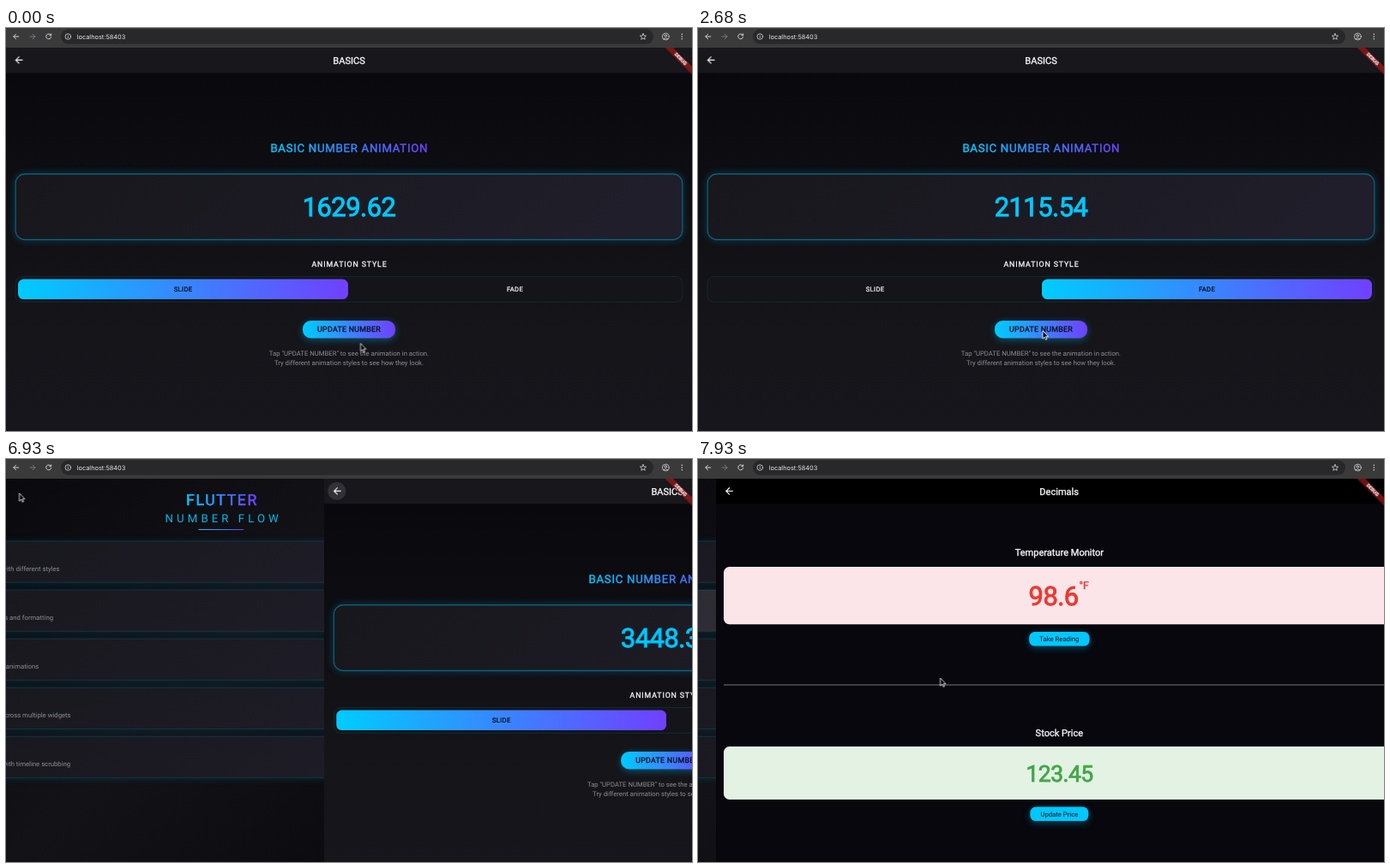
An HTML page for the animation above (8000 ms loop, 800 px wide and 471 px high).

```html
<!DOCTYPE html>
<html lang="en">
<head>
<meta charset="utf-8">
<title>Number animation demo</title>
<style>
html, body { margin: 0; width: 100%; height: 100%; overflow: hidden; background: #08080d; }
svg { display: block; width: 100vw; height: 100vh; }
text { font-family: Roboto, "Liberation Sans", sans-serif; text-rendering: geometricPrecision; white-space: pre; }
.m { text-anchor: middle; }
.b { stroke-width: .032em; }
.white { fill: #f7f7fa; }
.white.b { stroke: #f7f7fa; }
.dark { fill: #0a0a10; }
.dark.b { stroke: #0a0a10; }
.cyan { fill: #00c8ff; }
.cyan.b { stroke: #00c8ff; }
.grad { fill: url(#accent); }
.grad.b { stroke: url(#accent); }
.red { fill: #ea3a32; stroke: #ea3a32; }
.green { fill: #43a648; stroke: #43a648; }
.grey { fill: #8d8d93; }
.none { fill: none; stroke: none; }
.bar { font-size: 11.05px; }
.body { font-size: 7.735px; }
.head { font-size: 9.945px; }
.tab { font-size: 7.735px; letter-spacing: .28px; }
.num { font-size: 30.94px; letter-spacing: -.55px; }
.glow { filter: drop-shadow(0 0 5px rgba(0, 200, 255, .24)); }
.soft { filter: drop-shadow(0 1px 4px rgba(0, 200, 255, .13)); }
.lift { filter: drop-shadow(0 2px 4px rgba(0, 200, 255, .36)); }
.line { fill: none; stroke-linecap: round; stroke-linejoin: round; }

#home, #basics, #decimals, #cursor, .num, #selSlide, #selFade, #press, #ring, #hover1, #hover2 {
  animation: 8s linear infinite;
}
#home { animation-name: home; }
#basics { animation-name: basics; }
#decimals { animation-name: decimals; }
#cursor { animation-name: cursor; }
#selSlide { animation-name: selSlide; }
#selFade { animation-name: selFade; }
#press { animation-name: press; }
#ring { animation-name: ring; }
#hover1 { animation-name: hover1; }
#hover2 { animation-name: hover2; }
#n1 { animation-name: n1; }
#n2 { animation-name: n2; }
#n3 { animation-name: n3; }
#n4 { animation-name: n4; }

@keyframes basics {
  0% { transform: translateX(0); }
  85.575% { transform: translateX(0); animation-timing-function: cubic-bezier(.283, .044, .545, .57); }
  86.8125% { transform: translateX(432.8px); animation-timing-function: cubic-bezier(.209, 1, .4345, .976); }
  91.825%, 100% { transform: translateX(800px); }
}
@keyframes home {
  0% { transform: translateX(-266.7px); }
  85.575% { transform: translateX(-266.7px); animation-timing-function: cubic-bezier(.35, .91, .33, .97); }
  91.825% { transform: translateX(0); }
  95.375% { transform: translateX(0); animation-timing-function: cubic-bezier(.402, .787, .443, .95); }
  100% { transform: translateX(-261.8px); }
}
@keyframes decimals {
  0% { transform: translateX(800px); }
  95.375% { transform: translateX(800px); animation-timing-function: cubic-bezier(.283, .044, .545, .57); }
  96.6125% { transform: translateX(367.2px); animation-timing-function: cubic-bezier(.242, .798, .499, .957); }
  100% { transform: translateX(7.3px); }
}
@keyframes n1 {
  0% { transform: translateY(0); }
  5% { transform: translateY(0); animation-timing-function: cubic-bezier(.215, .61, .355, 1); }
  15%, 100% { transform: translateY(-48px); }
}
@keyframes n2 {
  0% { transform: translateY(48px); opacity: 1; }
  5% { transform: translateY(48px); animation-timing-function: cubic-bezier(.215, .61, .355, 1); }
  15% { transform: translateY(0); }
  33.75% { opacity: 1; }
  42.875%, 100% { opacity: 0; transform: translateY(0); }
}
@keyframes n3 {
  0%, 33.75% { opacity: 0; }
  42.875%, 100% { opacity: 1; }
  0% { transform: translateY(0); }
  70.375% { transform: translateY(0); animation-timing-function: cubic-bezier(.215, .61, .355, 1); }
  80.375%, 100% { transform: translateY(-48px); }
}
@keyframes n4 {
  0% { transform: translateY(48px); }
  70.375% { transform: translateY(48px); animation-timing-function: cubic-bezier(.215, .61, .355, 1); }
  80.375%, 100% { transform: translateY(0); }
}
@keyframes selSlide {
  0%, 16% { opacity: 1; }
  18.5%, 46.75% { opacity: 0; }
  48.75%, 100% { opacity: 1; }
}
@keyframes selFade {
  0%, 16% { opacity: 0; }
  18.5%, 46.75% { opacity: 1; }
  48.75%, 100% { opacity: 0; }
}
@keyframes press {
  0%, 4.75% { opacity: 0; }
  5.5%, 6.75% { opacity: .22; }
  9.25%, 33.5% { opacity: 0; }
  34.25%, 35.5% { opacity: .22; }
  38%, 70% { opacity: 0; }
  70.75%, 72% { opacity: .22; }
  74.5%, 100% { opacity: 0; }
}
@keyframes ring {
  0%, 82.3% { opacity: 0; }
  83%, 100% { opacity: 1; }
}
@keyframes hover1 {
  0%, 88.6% { opacity: 0; }
  89%, 89.6% { opacity: .045; }
  90.2%, 100% { opacity: 0; }
}
@keyframes hover2 {
  0%, 89.8% { opacity: 0; }
  90.4%, 95% { opacity: .045; }
  96%, 100% { opacity: .09; }
}
@keyframes cursor {
  0% { transform: translate(413.5px, 368.5px); }
  1.5% { transform: translate(413px, 371px); animation-timing-function: ease-in-out; }
  4.125% { transform: translate(405px, 354px); }
  12.5% { transform: translate(407px, 354px); animation-timing-function: ease-in-out; }
  15.625% { transform: translate(484.5px, 303px); }
  21.25% { transform: translate(484.5px, 303px); animation-timing-function: ease-in-out; }
  27.5% { transform: translate(420px, 381px); }
  30.6% { transform: translate(414px, 382px); animation-timing-function: ease-in-out; }
  33.1%, 45.25% { transform: translate(402px, 354px); }
  46.5% { transform: translate(362px, 307px); }
  47.5% { transform: translate(364px, 309px); }
  49.125% { transform: translate(374.5px, 320px); }
  52.5% { transform: translate(384px, 372px); }
  58.75% { transform: translate(376px, 380px); animation-timing-function: ease-in-out; }
  64.75% { transform: translate(388px, 354px); }
  71% { transform: translate(389px, 349px); }
  76% { transform: translate(390px, 350px); animation-timing-function: ease-in-out; }
  83.125% { transform: translate(16px, 39px); }
  86.625% { transform: translate(15.5px, 40px); animation-timing-function: ease-in-out; }
  91.625%, 92.125% { transform: translate(266.5px, 192px); }
  95% { transform: translate(269px, 187px); }
  99.125% { transform: translate(282.5px, 256px); }
  100% { transform: translate(283px, 257px); }
}
</style>
</head>
<body>
<svg viewBox="0 0 800 471" preserveAspectRatio="none">
  <defs>
    <linearGradient id="accent"><stop stop-color="#00ccff"/><stop offset="1" stop-color="#7040ff"/></linearGradient>
    <linearGradient id="panel" y2=".1"><stop stop-color="#17171c"/><stop offset="1" stop-color="#201e2a"/></linearGradient>
    <linearGradient id="page" x2="0" y2="1"><stop stop-color="#07070c"/><stop offset=".75" stop-color="#15151a"/><stop offset="1" stop-color="#16161c"/></linearGradient>
    <linearGradient id="homeBg" gradientUnits="userSpaceOnUse" x1="170" y1="0" x2="630" y2="471"><stop stop-color="#09090e"/><stop offset=".5" stop-color="#121217"/><stop offset="1" stop-color="#09090e"/></linearGradient>
    <linearGradient id="edge" x2="0" y2="1"><stop stop-color="#000"/><stop offset=".23" stop-color="#fff"/><stop offset=".77" stop-color="#fff"/><stop offset="1" stop-color="#000"/></linearGradient>
    <mask id="window" maskUnits="userSpaceOnUse" x="300" y="185" width="200" height="48"><rect x="300" y="185" width="200" height="48" fill="url(#edge)"/></mask>
    <path id="back" d="M20 11H7.83l5.59-5.59L12 4l-8 8 8 8 1.41-1.41L7.83 13H20z" transform="translate(8.4 30.9) scale(.5525)" fill="#fff"/>
    <g id="card">
      <rect class="soft" x="10.9" y="96" width="778.2" height="48.2" rx="9" fill="url(#panel)" stroke="#0e3d4c" stroke-width=".8"/>
      <rect x="21.7" y="107.5" width="25.4" height="25.4" rx="6.2" fill="url(#accent)"/>
      <rect x="761.3" y="111.7" width="16.6" height="16.6" rx="4.4" fill="#102b38"/>
      <path class="line" d="M768 116.8l3.2 3.2-3.2 3.2" stroke="#00c8ff" stroke-width="1.1"/>
    </g>
  </defs>

  <g id="home">
    <rect width="1100" height="471" fill="url(#homeBg)"/>
    <text class="m b grad" x="401.3" y="53.8" font-size="17.68" letter-spacing="1.68">FLUTTER</text>
    <text class="m cyan" x="403" y="73.6" font-size="13.26" letter-spacing="4.05" opacity=".92">NUMBER FLOW</text>
    <rect x="373.5" y="81.9" width="53" height="1.2" rx=".6" fill="url(#accent)"/>
    <use href="#card"/><use href="#card" y="57.1"/><use href="#card" y="114.2"/><use href="#card" y="171.3"/><use href="#card" y="228.4"/>
    <g fill="#fff">
      <rect id="hover1" x="11" y="96" width="778" height="48.2" rx="9"/>
      <rect id="hover2" x="11" y="153.1" width="778" height="48.2" rx="9"/>
    </g>
    <g class="head b white">
      <text class="b white" x="55" y="117">Basics</text>
      <text class="b white" x="55" y="174.1">Decimals</text>
      <text class="b white" x="55" y="231.2">Compact</text>
      <text class="b white" x="55" y="288.3">Group Sync</text>
      <text class="b white" x="55" y="345.4">Scrub Timeline</text>
    </g>
    <g class="body grey">
      <text x="55" y="130.8">Basic number animations with different styles</text>
      <text x="55" y="187.9">Decimal number animations and formatting</text>
      <text x="55" y="245">Compact notation (K, M, B) animations</text>
      <text x="55" y="302.1">Synchronized animations across multiple widgets</text>
      <text x="55" y="359.2">Manual animation control with timeline scrubbing</text>
    </g>
    <g fill="#14141c" stroke="#14141c" stroke-width="0">
      <path transform="translate(27.8 113.6) scale(.5525)" fill-rule="evenodd" d="M20 10V8h-4V4h-2v4h-4V4H8v4H4v2h4v4H4v2h4v4h2v-4h4v4h2v-4h4v-2h-4v-4zm-6 4h-4v-4h4z"/>
      <g transform="translate(27.8 170.7) scale(.5525)" class="line" stroke-width="2">
        <rect x="2" y="4" width="20" height="16" rx="1"/><path d="M6 12V8h4M18 12v4h-4" stroke-linecap="butt"/>
      </g>
      <path transform="translate(27.8 227.8) scale(.5525)" d="M4 9h16v2H4zM4 13h16v2H4zM8 19h3v4h2v-4h3l-4-4zM16 5h-3V1h-2v4H8l4 4z"/>
      <g transform="translate(27.8 284.9) scale(.5525)">
        <path d="M12 5a7 7 0 0 1 6 10.5M12 19a7 7 0 0 1-6-10.5" fill="none" stroke-width="2"/>
        <path d="M12 1v8L8 5zM12 15v8l4-4z"/>
      </g>
      <g transform="translate(27.8 342) scale(.5525)">
        <path d="M3 16l7-7 5 5 6-6" fill="none" stroke-width="2"/>
        <circle cx="3" cy="16" r="2"/><circle cx="10" cy="9" r="2"/><circle cx="15" cy="14" r="2"/><circle cx="21" cy="8" r="2"/>
      </g>
    </g>
  </g>

  <g id="basics">
    <rect y="23" width="800" height="448" fill="url(#page)"/>
    <rect y="23" width="800" height="29.4" fill="#17171c"/>
    <circle id="ring" cx="14.7" cy="37.5" r="10.6" fill="#313137"/>
    <use href="#back"/>
    <text class="bar m b white" x="400" y="41.8">BASICS</text>
    <text class="m b grad" x="400.3" y="144.6" font-size="13.26" letter-spacing=".7">BASIC NUMBER ANIMATION</text>

    <rect class="glow" x="11.2" y="170.6" width="777.6" height="76.8" rx="11" fill="url(#panel)" stroke="#0b6882" stroke-width="1.1"/>
    <g mask="url(#window)">
      <text id="n1" class="num m b cyan" x="400" y="220">1629<tspan class="none">.</tspan>62</text>
      <text id="n2" class="num m b cyan" x="400" y="220">2115<tspan class="none">.</tspan>54</text>
      <text id="n3" class="num m b cyan" x="400" y="220">2713<tspan class="none">.</tspan>22</text>
      <text id="n4" class="num m b cyan" x="400" y="220">3448<tspan class="none">.</tspan>37</text>
      <text class="num m b cyan" x="400" y="220"><tspan class="none">0000</tspan>.<tspan class="none">00</tspan></text>
    </g>

    <text class="m b white" x="400.5" y="278.7" font-size="8.84" letter-spacing=".85">ANIMATION STYLE</text>
    <rect x="11.2" y="290.5" width="777.6" height="29.8" rx="7.5" fill="#141419" stroke="#12313d" stroke-width=".8"/>
    <text class="tab m b white" x="206.6" y="308.3">SLIDE</text>
    <text class="tab m b white" x="593.5" y="308.3">FADE</text>
    <g id="selSlide">
      <rect x="14" y="293.5" width="385" height="23.6" rx="6.6" fill="url(#accent)"/>
      <text class="tab m b dark" x="206.6" y="308.3">SLIDE</text>
    </g>
    <g id="selFade">
      <rect x="401" y="293.5" width="385" height="23.6" rx="6.6" fill="url(#accent)"/>
      <text class="tab m b dark" x="593.5" y="308.3">FADE</text>
    </g>

    <rect class="lift" x="346" y="342" width="108" height="20.5" rx="9.5" fill="url(#accent)"/>
    <rect id="press" x="346" y="342" width="108" height="20.5" rx="9.5" fill="#16161c"/>
    <text class="m b dark" x="400.1" y="355.4" font-size="8.84" letter-spacing=".28">UPDATE NUMBER</text>
    <text class="body m grey" x="400" y="383">Tap "UPDATE NUMBER" to see the animation in action.</text>
    <text class="body m grey" x="400" y="394">Try different animation styles to see how they look.</text>
  </g>

  <g id="decimals">
    <rect y="23" width="800" height="448" fill="#07070d"/>
    <rect y="23" width="800" height="29.4" fill="#000"/>
    <use href="#back"/>
    <text class="bar m b white" x="399.8" y="41.8">Decimals</text>
    <text class="bar m b white" x="400" y="113.4">Temperature Monitor</text>
    <rect x="8.6" y="126" width="782.8" height="67.3" rx="6.6" fill="#fce5e8"/>
    <text class="num b red" x="364.2" y="171">98.6</text>
    <text class="b red" x="423" y="152" font-size="12.4">°F</text>
    <rect class="lift" x="364.8" y="202" width="70.4" height="16.6" rx="6.6" fill="#00c8ff"/>
    <text class="body m dark" x="400" y="213.3">Take Reading</text>
    <rect x="8.6" y="263.6" width="782.8" height=".8" fill="#96949a"/>
    <text class="bar m b white" x="400" y="324">Stock Price</text>
    <rect x="8.6" y="336" width="782.8" height="62" rx="6.6" fill="#e3f2e2"/>
    <text class="m b green" x="400.2" y="377" font-size="26.52" letter-spacing="-.55">123.45</text>
    <rect class="lift" x="366" y="406.5" width="68" height="16.6" rx="6.6" fill="#00c8ff"/>
    <text class="body m dark" x="400" y="417.8">Update Price</text>
  </g>

  <g transform="translate(800 23) scale(.5525) rotate(45)">
    <rect x="-60" y="28" width="120" height="12" fill="#b71c1c" fill-opacity=".63" style="filter:drop-shadow(0 0 3px rgba(0,0,0,.5))"/>
    <text class="m b white" y="37.6" font-size="10.2" font-weight="700">DEBUG</text>
  </g>

  <g id="browser">
    <rect width="800" height="23" fill="#3a3a3b"/>
    <rect x="64" y="1.2" width="691" height="17.6" rx="8.8" fill="#28282a"/>
    <g class="line" stroke="#d6d6d8" stroke-width=".95">
      <path d="M14.8 10H8.8M11.6 7.2L8.8 10l2.8 2.8"/>
      <path d="M28 10h6M31.2 7.2L34 10l-2.8 2.8" stroke="#7c7c7f"/>
      <path d="M52.3 8.2A3 3 0 1 0 52.7 10.6M52.7 6.8v1.9h-1.9"/>
      <circle cx="72.3" cy="10" r="3.3" stroke-width=".8"/><path d="M72.3 9.8v1.7M72.3 8.3v.1" stroke-width=".8"/>
      <path d="M743 6.5l1 2.4 2.6.2-2 1.7.6 2.5-2.2-1.3-2.2 1.3.6-2.5-2-1.7 2.6-.2z" stroke-width=".8"/>
      <circle cx="769.3" cy="10" r="3.9" stroke-width=".8"/><circle cx="769.3" cy="9" r="1.3" stroke-width=".8"/>
      <path d="M766.8 12.7q2.5-2 5 0" stroke-width=".8"/>
    </g>
    <g fill="#d6d6d8"><circle cx="788.3" cy="7.2" r=".8"/><circle cx="788.3" cy="10" r=".8"/><circle cx="788.3" cy="12.8" r=".8"/></g>
    <text x="82.7" y="12.8" fill="#e6e6e8" font-size="7.4" style="font-family:Inter,sans-serif">localhost:58403</text>
  </g>

  <path id="cursor" d="M0 0V9.2L2.1 7.2 3.6 10.3 5 9.7 3.6 6.7H6.4Z" fill="#000" stroke="#fff" stroke-width=".8" stroke-linejoin="round"/>
</svg>
</body>
</html>
```
